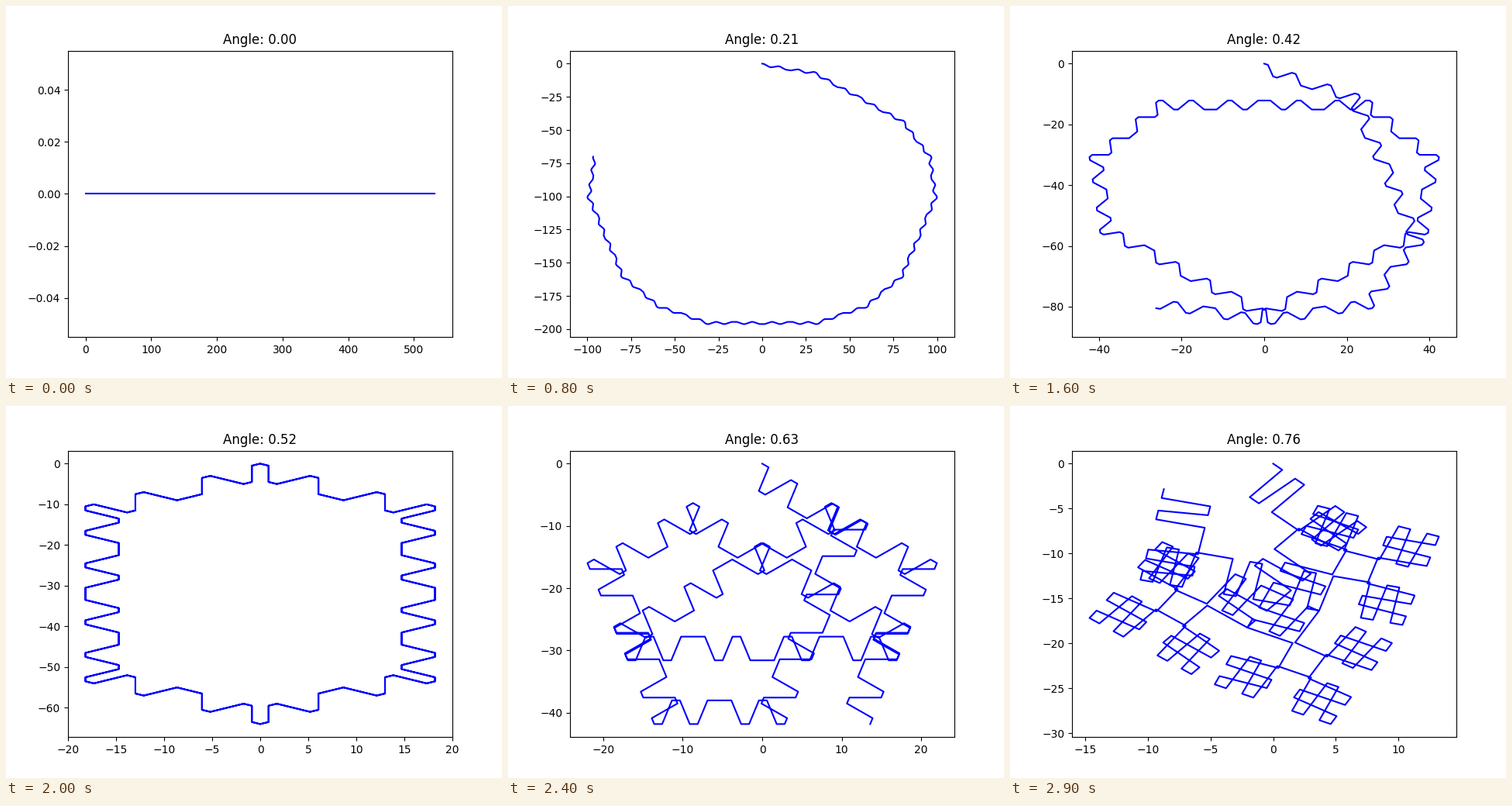
Write a matplotlib script that moves like this. It is 640 px wide and 480 px high and loops after 3000 ms.

```python
import numpy as np
import matplotlib.pyplot as plt
from matplotlib.animation import FuncAnimation

FRAMES = 30
INTERVAL = 100  # ms

# Kolam L-system: F draws one unit, + and - turn by the angle
RULES = {
    "A": "F++FFFF--F--FFFF++F++FFFF--F",
    "B": "F--FFFF++F++FFFF--F--FFFF++F",
    "C": "BFA--BFA",
    "D": "CFC--CFC",
}


def expand(word, depth):
    for _ in range(depth):
        word = "".join(RULES.get(c, c) for c in word)
    return word


def step_turns(word):
    """Heading of every unit step, counted in turns."""
    heading, turns = 0, []
    for c in word:
        if c == "F":
            turns.append(heading)
        else:
            heading += 1 if c == "+" else -1
    return np.array(turns)


TURNS = step_turns(expand("-D--D", 3))


def trace(angle):
    x = np.cumsum(np.cos(TURNS * angle))
    y = np.cumsum(np.sin(TURNS * angle))
    return np.append(0, x), np.append(0, y)


fig, ax = plt.subplots(figsize=(6.4, 4.8), dpi=100)


def draw(i):
    angle = i * np.pi / 4 / FRAMES
    ax.clear()
    ax.plot(*trace(angle), color="blue", lw=1.5)
    ax.set_title(f"Angle: {angle:.2f}")


anim = FuncAnimation(fig, draw, frames=FRAMES, interval=INTERVAL,
                     init_func=lambda: draw(0), repeat=True, repeat_delay=0)
plt.show()
```
